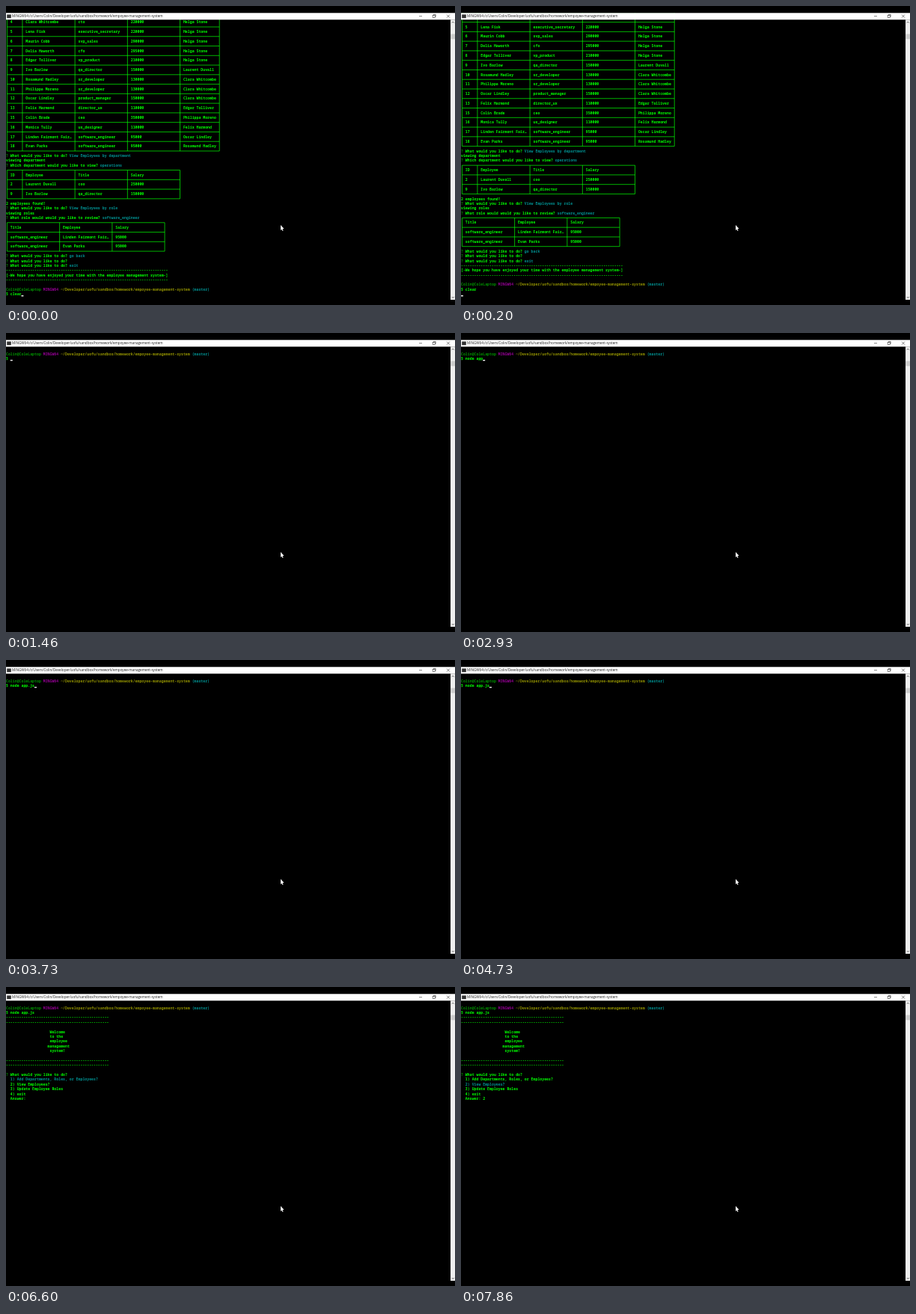
An HTML page with a canvas that plays this animation: 600 by 400 pixels, repeating every 8 s.

```html
<!DOCTYPE html>
<html lang="en">
<head>
<meta charset="utf-8">
<title>Terminal session</title>
<style>
  html, body { margin: 0; width: 100%; height: 100%; overflow: hidden; background: #000; }
  canvas { display: block; }
</style>
</head>
<body>
<canvas id="stage" width="600" height="400"></canvas>
<script>
const ctx = document.getElementById('stage').getContext('2d');
const LOOP = 8000, CELL = 2.925, ROW = 6.385, TOP = 21.6;
const GREEN = '#00ff00', DIM = '#009000', CYAN = '#009090', PURPLE = '#900090', OLIVE = '#909000';
const PATH = '/Developer/uofu/sandbox/homework/empoyee-management-system';
const ASK = 'What would you like to do? ';

const staff = [
  ['4', 'Clara Whitcombe', 'cto', '220000', 'Helga Stone'],
  ['5', 'Lena Fisk', 'executive_secretary', '220000', 'Helga Stone'],
  ['6', 'Maurin Cobb', 'svp_sales', '290000', 'Helga Stone'],
  ['7', 'Delia Haworth', 'cfo', '295000', 'Helga Stone'],
  ['8', 'Edgar Tolliver', 'vp_product', '210000', 'Helga Stone'],
  ['9', 'Ivo Barlow', 'qa_director', '150000', 'Laurent Duvall'],
  ['10', 'Rosamund Hadley', 'sr_developer', '130000', 'Clara Whitcombe'],
  ['11', 'Philippa Moreno', 'sr_developer', '130000', 'Clara Whitcombe'],
  ['12', 'Oscar Lindley', 'product_manager', '150000', 'Clara Whitcombe'],
  ['13', 'Felix Harmond', 'director_ux', '110000', 'Edgar Tolliver'],
  ['15', 'Colin Brade', 'ceo', '350000', 'Philippa Moreno'],
  ['16', 'Monica Tully', 'ux_designer', '110000', 'Felix Harmond'],
  ['17', 'Linden Fairmont Fair…', 'software_engineer', '95000', 'Oscar Lindley'],
  ['18', 'Evan Parks', 'software_engineer', '95000', 'Rosamund Hadley']
];
const operations = [
  ['ID', 'Employee', 'Title', 'Salary'],
  ['2', 'Laurent Duvall', 'coo', '250000'],
  ['9', 'Ivo Barlow', 'qa_director', '150000']
];
const engineers = [
  ['Title', 'Employee', 'Salary'],
  ['software_engineer', 'Linden Fairmont Fair…', '95000'],
  ['software_engineer', 'Evan Parks', '95000']
];

const rowY = row => TOP + row * ROW;

function rect(color, x, y, w, h) {
  ctx.fillStyle = color;
  ctx.fillRect(x, y, w, h);
}

function line(color, width, ...points) {
  ctx.strokeStyle = color;
  ctx.lineWidth = width;
  ctx.beginPath();
  for (let i = 0; i < points.length; i += 2) ctx.lineTo(points[i], points[i + 1]);
  ctx.stroke();
}

// Writes at large size under a scale, so tiny glyphs keep fractional positions.
function glyphs(text, x, y, color, font) {
  ctx.save();
  ctx.translate(x, y);
  ctx.scale(.1, .1);
  ctx.font = font;
  ctx.fillStyle = color;
  ctx.fillText(text, 0, 0);
  ctx.restore();
}

function say(row, col, ...parts) {
  for (let i = 0; i < parts.length; i += 2)
    for (const ch of parts[i]) {
      if (ch !== ' ')
        glyphs(ch, col * CELL, rowY(row) + 1.7, parts[i + 1], 'bold 48.75px "Noto Sans Mono", monospace');
      col++;
    }
}

function table(top, edges, rows) {
  const xs = edges.map(e => (e + .5) * CELL), bottom = top + 2 * rows.length;
  xs.forEach(x => line(GREEN, .7, x, rowY(top), x, rowY(bottom)));
  for (let r = top; r <= bottom; r += 2) line(GREEN, .7, xs[0], rowY(r), xs.at(-1), rowY(r));
  rows.forEach((cells, r) => cells.forEach((text, c) => say(top + 1 + 2 * r, edges[c] + 2, text, GREEN)));
}

function ask(row, answer = '', question = ASK) {
  say(row, 0, '? ', DIM, question, GREEN, answer, CYAN);
}

function prompt(row, command) {
  say(row, 0, 'Colin@ColeLaptop ', DIM, 'MINGW64 ', PURPLE, '~' + PATH, OLIVE, ' (master)', CYAN);
  say(row + 1, 0, '$ ' + command, GREEN);
}

function caret(row, col) {
  rect('#fff', col * CELL, rowY(row) + 1.5, CELL, 1.4);
}

function report(shift) {
  const at = row => row - shift;
  table(at(-1), [0, 7, 31, 55, 79, 97], staff);
  ask(at(28), 'View Employees by department');
  say(at(29), 0, 'viewing department', GREEN);
  ask(at(30), 'operations', 'Which department would you like to view? ');
  table(at(31), [0, 7, 31, 55, 79], operations);
  say(at(38), 0, '2 employees found!', GREEN);
  ask(at(39), 'View Employees by role');
  say(at(40), 0, 'viewing roles', GREEN);
  ask(at(41), 'software_engineer', 'What role would would you like to review? ');
  table(at(42), [0, 24, 48, 72], engineers);
  ask(at(49), 'go back');
  ask(at(50));
  ask(at(51), 'exit');
  say(at(52), 0, '-'.repeat(74), GREEN);
  say(at(53), 0, '[-We hope you have enjoyed your time with the employee management system-]', GREEN);
  say(at(54), 0, '-'.repeat(74), GREEN);
  prompt(at(56), 'clear');
  if (shift) caret(57, 0); else caret(57, 7);
}

function menu(t) {
  const picked = t >= 7660 ? 1 : 0;
  for (const row of [3, 4, 12, 13]) say(row, 0, '-'.repeat(47), GREEN);
  ['Welcome', 'to the', 'employee', 'management', 'system!'].forEach((word, i) =>
    say(6 + i, i === 3 ? 19 : 20, word, GREEN));
  ask(15);
  ['Add Departments, Roles, or Employees?', 'View Employees?', 'Update Employee Roles', 'exit'].forEach((item, i) =>
    say(16 + i, 2, `${i + 1}) ${item}`, i === picked ? CYAN : GREEN));
  say(20, 2, 'Answer: ' + (picked ? '2' : ''), GREEN);
  if (t < 6330 || (t >= 6800 && t < 7330) || (picked && t < 7860)) caret(20, 10 + picked);
}

// Each step: start time and number of typed characters.
const keys = [[1730, 2], [2060, 3], [2400, 5], [2660, 6], [2930, 8], [3200, 9], [3530, 10], [3730, 11]];

function session(t) {
  if (t < 860) {
    if (t < 530) caret(0, 0);
    return;
  }
  const typed = keys.reduce((n, [start, count]) => t >= start ? count : n, 0);
  prompt(1, 'node app.js'.slice(0, typed));
  if (t >= 5860) menu(t);
  else if (t >= 4930) { if (t < 5330) caret(3, 0); }
  else if (t >= 1200 && (t < 4130 || t >= 4730)) caret(2, 2 + typed);
}

function chrome() {
  rect('#000', 0, 0, 600, 9.3);
  rect('#fff', 0, 9.3, 600, 9);
  rect('#333', 1.2, 11.4, 5.6, 4.8);
  glyphs('MINGW64:/c/Users/Colin' + PATH, 8, 15.3, '#222', '46px "Open Sans", sans-serif');
  line('#333', .6, 552, 13.7, 556, 13.7);
  ctx.strokeRect(570.2, 12.4, 3, 3);
  line('#333', .6, 571.2, 12.2, 571.2, 11.4, 574.2, 11.4, 574.2, 14.4, 573.4, 14.4);
  line('#333', .6, 589, 11.6, 593, 15.6);
  line('#333', .6, 593, 11.6, 589, 15.6);
  rect('#f0f0f0', 594, 18.3, 6, 374.7);
  rect('#cdcdcd', 594.3, 37.5, 5.7, 6.8);
  line('#444', .8, 595.8, 22.6, 597.3, 21, 598.8, 22.6);
  line('#444', .8, 595.8, 389, 597.3, 390.6, 598.8, 389);
}

function pointer() {
  const p = [[367, 293], [367, 300], [368.5, 298.7], [369.5, 301], [370.5, 300.5], [369.6, 298.3], [371.5, 298.1]];
  ctx.fillStyle = '#fff';
  ctx.beginPath();
  p.forEach(([x, y]) => ctx.lineTo(x, y));
  ctx.fill();
}

const start = performance.now();
function draw(now) {
  const t = Math.max(0, now - start) % LOOP;
  rect('#000', 0, 0, 600, 400);
  if (t < 330) report(t < 200 ? 0 : 1);
  else session(t);
  chrome();
  pointer();
  requestAnimationFrame(draw);
}
draw(start);
</script>
</body>
</html>
```
